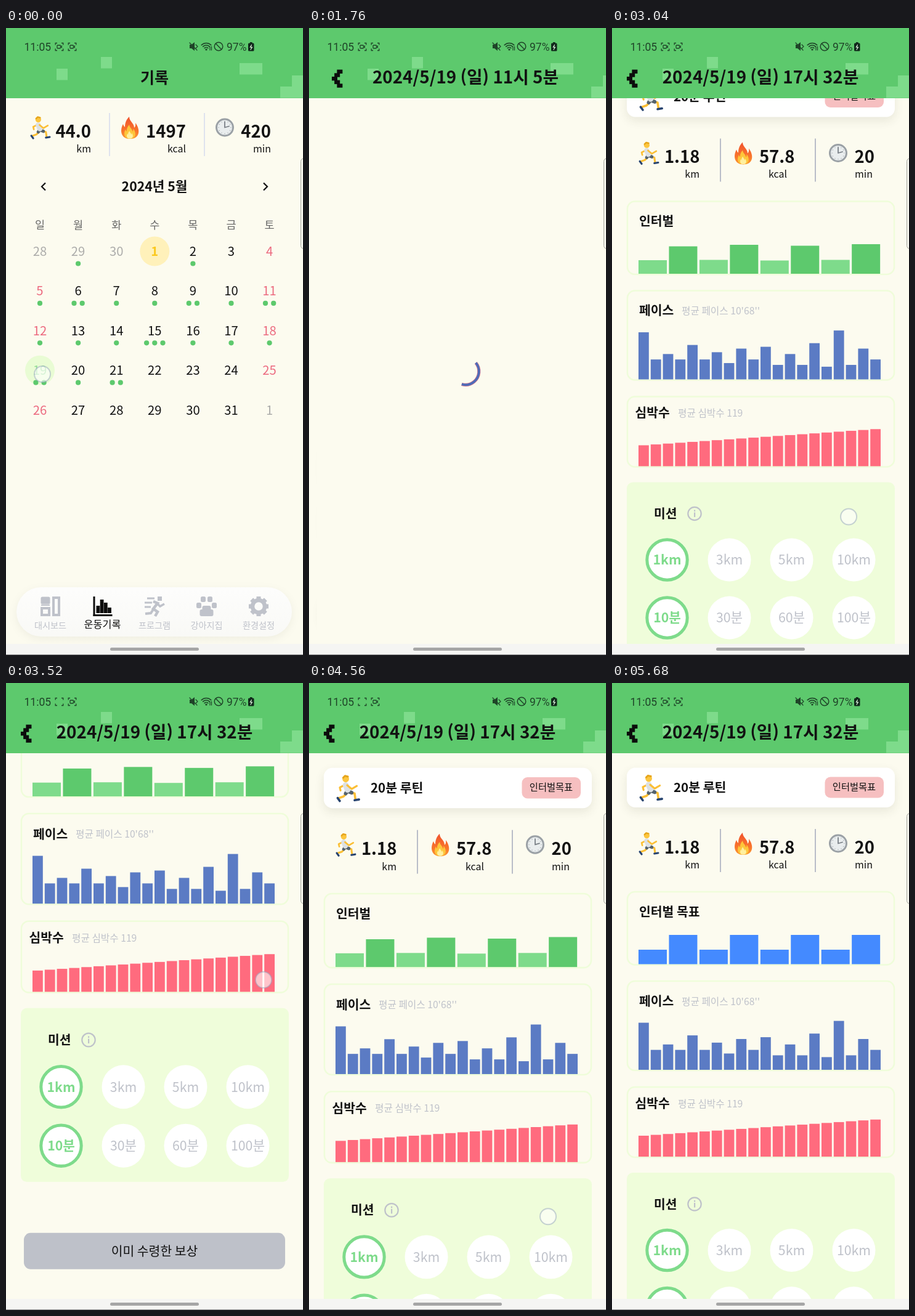
Animation of 482x1018 px, one loop 5.84 s. Source, as an HTML page with a canvas:

```html
<!DOCTYPE html>
<html lang="ko">
<head>
<meta charset="utf-8">
<style>
html, body { margin: 0; width: 100%; height: 100%; overflow: hidden; background: #fcfbef; }
canvas { display: block; width: 482px; height: 1018px; }
</style>
</head>
<body>
<canvas id="stage"></canvas>
<script>
const W = 482, H = 1018, LOOP = 5840, TOP = 114, BOTTOM = 1000;
const FONT = '"Noto Sans CJK KR", "Noto Sans CJK", "Noto Sans", sans-serif';
const C = {
  bg: '#fcfbef', head: '#5dc96d', light: '#7edb8b', ink: '#121212', gray: '#bfc2ca',
  mint: '#effdda', red: '#ec6a7f', blue: '#5b7bc4', pink: '#ff6b7e', status: '#1f4428'
};
const canvas = document.getElementById('stage');
const dpr = window.devicePixelRatio || 1;
canvas.width = W * dpr;
canvas.height = H * dpr;
const g = canvas.getContext('2d');

// ---------- helpers ----------
const clamp = (v, a = 0, b = 1) => Math.min(b, Math.max(a, v));
const ramp = (t, a, b) => clamp((t - a) / (b - a));
const easeOut = p => 1 - (1 - p) ** 3;

// Smooth curve through [time, value] points without overshoot
function curve(t, pts) {
  const n = pts.length - 1;
  if (t <= pts[0][0]) return pts[0][1];
  if (t >= pts[n][0]) return pts[n][1];
  const rate = i => (pts[i + 1][1] - pts[i][1]) / (pts[i + 1][0] - pts[i][0]);
  const slope = i => {
    if (i === 0 || i === n) return 0;
    const a = rate(i - 1), b = rate(i);
    return a * b <= 0 ? 0 : 2 * a * b / (a + b);
  };
  let i = 0;
  while (t > pts[i + 1][0]) i++;
  const d = pts[i + 1][0] - pts[i][0], p = (t - pts[i][0]) / d, q = 1 - p;
  return pts[i][1] * q * q * (1 + 2 * p) + pts[i + 1][1] * p * p * (1 + 2 * q)
    + d * p * q * (slope(i) * q - slope(i + 1) * p);
}
function rect(x, y, w, h, color) {
  g.fillStyle = color;
  g.fillRect(x, y, w, h);
}
function round(x, y, w, h, r, fill, stroke, line = 2) {
  g.beginPath();
  g.roundRect(x, y, w, h, r);
  paint(fill, stroke, line);
}
function circle(x, y, r, fill, stroke, line = 2) {
  g.beginPath();
  g.arc(x, y, r, 0, 7);
  paint(fill, stroke, line);
}
function paint(fill, stroke, line) {
  if (fill) { g.fillStyle = fill; g.fill(); }
  if (stroke) { g.strokeStyle = stroke; g.lineWidth = line; g.stroke(); }
}
function path(points, color, width, cap = 'round') {
  g.beginPath();
  for (let i = 0; i < points.length; i += 2) g.lineTo(points[i], points[i + 1]);
  g.lineCap = cap;
  g.lineJoin = cap === 'round' ? 'round' : 'miter';
  paint(null, color, width);
}
function text(s, x, y, size, color = C.ink, weight = 500, align = 'left', font = FONT) {
  g.font = `${weight} ${size}px ${font}`;
  g.textAlign = align;
  g.fillStyle = color;
  g.fillText(s, x, y);
}
function at(x, y, scale, draw) {
  g.save();
  g.translate(x, y);
  g.scale(scale, scale);
  draw();
  g.restore();
}
function shadow(draw, alpha = 0.1, blur = 16, dy = 6) {
  g.save();
  g.shadowColor = `rgba(60,60,40,${alpha})`;
  g.shadowBlur = blur * dpr;
  g.shadowOffsetY = dy * dpr;
  draw();
  g.restore();
}

// ---------- small pictures ----------
function runner() {
  const skin = '#fbbf35', navy = '#27436f';
  path([11, 14, 5, 17, 6, 21], skin, 2.6);
  path([15, 24, 10, 29, 4, 31], skin, 3);
  path([19, 24, 25, 25, 26, 32], skin, 3);
  path([2, 31, 5, 35], navy, 3);
  path([25, 34, 31, 33], navy, 3);
  path([15, 22, 13, 25], '#56636d', 5);
  path([16, 22, 21, 24], '#56636d', 5);
  path([13, 14, 15.5, 20], '#dde1e4', 8);
  path([15, 14, 21, 19, 28, 15], skin, 2.6);
  circle(13, 5.5, 4.5, '#fcc63f');
  path([9.5, 4, 12, 1.5, 16, 2.5], '#e6a51b', 2.4);
}
function fire() {
  const flame = (color) => {
    g.beginPath();
    g.moveTo(14, 36);
    g.bezierCurveTo(0, 36, -3, 23, 3, 12);
    g.quadraticCurveTo(4, 16, 6, 17);
    g.bezierCurveTo(6, 9, 9, 4, 13, 0);
    g.bezierCurveTo(13, 8, 21, 10, 21, 18);
    g.quadraticCurveTo(24, 15, 23, 10);
    g.bezierCurveTo(32, 22, 30, 36, 14, 36);
    g.fillStyle = color;
    g.fill();
  };
  const tone = g.createLinearGradient(0, 0, 0, 36);
  tone.addColorStop(0, '#f0522d');
  tone.addColorStop(0.65, '#f9762c');
  tone.addColorStop(1, '#fb9a30');
  flame(tone);
  at(5, 13, 0.63, () => flame('#fdc63b'));
  at(9, 23, 0.35, () => flame('#fff0a0'));
}
function clock() {
  circle(0, 0, 13.5, '#e9edee', '#9ba1a6', 3);
  for (let i = 0; i < 12; i++) {
    const a = i * Math.PI / 6;
    circle(10 * Math.cos(a), 10 * Math.sin(a), 0.7, '#a5aaae');
  }
  path([0, -9, 0, 0, 7, -2], '#7a8087', 1.8);
}
function recorder(x, showCam) {
  for (const [sx, sy] of [[-1, -1], [1, -1], [1, 1], [-1, 1]])
    path([x + sx * 3.5, 30.5 + sy * 6, x + sx * 6.3, 30.5 + sy * 6, x + sx * 6.3, 30.5 + sy * 3], C.status, 1.3, 'butt');
  if (!showCam) return;
  round(x - 3.5, 28, 5.5, 5, 1, null, C.status, 1.3);
  path([x + 2, 30.5, x + 4, 28.7, x + 4, 32.3, x + 2, 30.5], C.status, 1);
}

// ---------- system overlays ----------
function statusBar(t) {
  const phase = t % 1040;
  text('11:05', 29.5, 36.5, 17.5, C.status, 400, 'left', 'Roboto, sans-serif');
  recorder(86.5, phase < 240 || phase >= 480);
  recorder(107.5, true);
  g.fillStyle = C.status;
  g.beginPath();
  for (const [x, y] of [[298, 27], [301, 27], [306, 23], [306, 37], [301, 33], [298, 33]]) g.lineTo(x, y);
  g.fill();
  path([298, 24, 310, 36], C.status, 1.3);
  path([308, 27, 311, 30, 308, 33], C.status, 1.3);
  for (const r of [4, 7.5, 11]) {
    g.beginPath();
    g.arc(325, 35.5, r, -2.35, -0.79);
    paint(null, C.status, 1.6);
  }
  circle(325, 35, 1.6, C.status);
  path([331, 30, 331, 36], C.status, 1.2);
  path([333.5, 30, 333.5, 36], C.status, 1.2);
  circle(345, 30, 6.8, null, C.status, 1.5);
  path([340.3, 25.3, 349.7, 34.7], C.status, 1.5);
  text('97%', 358, 36.5, 17.5, C.status, 400, 'left', 'Roboto, sans-serif');
  round(393, 24.5, 9.5, 13, 1.5, '#10281a');
  rect(396, 23, 3.5, 2, '#10281a');
  path([398.5, 27.5, 396.2, 31.2, 399.5, 31.2, 397, 35], '#dff5e0', 1.2);
}
function systemEdges() {
  rect(0, BOTTOM, W, 18, '#f5f5f3');
  rect(0, 1017, W, 1, '#8f8f8f');
  round(169, 1006, 144, 5, 2.5, '#a6a6a6');
  round(478.5, 211.5, 14, 147, 5, '#f6f6ee', '#a3a39c', 1);
}
function touch(x, y, alpha) {
  if (alpha <= 0) return;
  g.save();
  g.globalAlpha = alpha;
  circle(x, y, 13, 'rgba(255,255,255,.6)', 'rgba(150,165,190,.5)', 2);
  g.restore();
}
function header(title, size, back) {
  rect(0, 0, W, TOP, C.head);
  for (const [x, y, w] of [[82, 66, 18], [154, 47, 18], [379, 57, 37], [464, 77, 18], [445, 95, 37]])
    rect(x, y, w, 18.5, C.light);
  text(title, 241, 90, size, C.ink, 700, 'center');
  if (back) for (let i = -2; i <= 2; i++)
    rect(24 + Math.abs(i) * 4.2, 79 + i * 5.7, 9, 6.4, '#0c0c0c');
}

// ---------- shared pieces ----------
function stats(y, x, values, unitX, line) {
  at(x[0], y + 5, 1.03, runner);
  at(x[1], y + 6, 1, fire);
  at(x[2], y + 23.5, 1, clock);
  values.forEach(([value, unit, right], i) => {
    text(value, right, y + 40, 27.5, C.ink, 700, 'right');
    text(unit, unitX[i], y + 64, 16, C.ink, 500, 'right');
  });
  rect(x[3], y, 2, 70, line);
  rect(x[3] + 154, y, 2, 70, line);
}
function recordCard(y) {
  shadow(() => round(24, y, 435, 64.5, 14, '#fff'));
  at(44, y + 11, 1.2, runner);
  text('20분 루틴', 100, y + 39.5, 20.5, C.ink, 700);
  round(345.5, y + 15, 95.5, 34, 9, '#f6bfc0');
  text('인터벌목표', 393, y + 36.5, 15.3, C.ink, 500, 'center');
}

// ---------- calendar page ----------
const dotCount = '01001001211212111311121200000000000';
const tabs = ['대시보드', '운동기록', '프로그램', '강아지집', '환경설정'];

function tabIcon(i, x, y, c) {
  if (i === 0) {
    round(x - 14, y - 14, 12, 9, 1, c, c, 3);
    round(x - 14, y + 3, 12, 11, 0, null, c, 4);
    rect(x - 15, y - 3, 14, 2, c);
    round(x + 5, y - 14, 9, 28, 0, null, c, 4);
  } else if (i === 1) {
    rect(x - 15, y - 16, 3, 32, c);
    rect(x - 15, y + 13, 31, 3, c);
    [12, 22, 17, 9].forEach((h, k) => rect(x - 10 + k * 6.2, y + 11 - h, 5.8, h, c));
  } else if (i === 2) {
    rect(x + 5, y - 16, 7, 7, c);
    path([x - 12, y - 13, x, y - 13], c, 3, 'butt');
    path([x - 16, y - 6, x - 4, y - 6], c, 3, 'butt');
    path([x - 16, y + 1, x - 6, y + 1], c, 3, 'butt');
    path([x - 2, y - 8, x + 5, y - 5, x - 2, y + 4, x + 5, y + 9, x + 1, y + 16], c, 4.5, 'butt');
    path([x - 2, y + 5, x - 6, y + 11, x - 15, y + 12], c, 4, 'butt');
    path([x + 5, y - 4, x + 9, y, x + 16, y - 4], c, 3.5, 'butt');
  } else if (i === 3) {
    for (const [dx, dy] of [[-5.5, -11], [5.5, -11], [-12.5, -1], [12.5, -1]])
      round(x + dx - 4, y + dy - 5, 8, 9, 2.5, c);
    round(x - 7, y - 1, 14, 9, 3, c);
    round(x - 11, y + 5, 22, 11, 3, c);
  } else {
    circle(x, y, 10, null, c, 6.5);
    for (let k = 0; k < 8; k++) {
      g.save();
      g.translate(x, y);
      g.rotate(k * Math.PI / 4);
      rect(-3.5, -16, 7, 6, c);
      g.restore();
    }
  }
}
function tabBar() {
  const tone = g.createLinearGradient(0, 908, 0, 988);
  tone.addColorStop(0, '#fdfdfc');
  tone.addColorStop(1, '#f9f9f6');
  shadow(() => round(17, 908, 447, 80, 40, tone), 0.07, 14, 4);
  tabs.forEach((name, i) => {
    const x = 72 + i * 84.5, on = i === 1;
    tabIcon(i, x, 939, on ? '#0c0c0c' : C.gray);
    text(name, x, on ? 974 : 974.5, on ? 16.3 : 14.2, on ? C.ink : C.gray, 500, 'center');
  });
}
function calendarPage(t) {
  rect(0, 0, W, H, C.bg);
  stats(138, [39, 187, 355, 167],
    [['44.0', 'km', 138], ['1497', 'kcal', 292], ['420', 'min', 430]], [138, 292, 430], '#dfe3ee');
  path([64, 251.5, 58, 257.5, 64, 263.5], C.ink, 2.2, 'butt');
  path([418, 251.5, 424, 257.5, 418, 263.5], C.ink, 2.2, 'butt');
  text('2024년 5월', 241, 265, 21.3, C.ink, 700, 'center');

  const picked = 0.6 + 0.4 * ramp(t, 60, 260);
  [...'일월화수목금토'].forEach((d, i) => text(d, 55 + i * 62.1, 326, 17.5, '#686868', 500, 'center'));
  for (let i = 0; i < 35; i++) {
    const col = i % 7, row = Math.floor(i / 7), x = 55 + col * 62.1, y = 362.5 + row * 64.4;
    const day = i < 3 ? 28 + i : (i - 3) % 31 + 1;
    let color = col % 6 ? C.ink : C.red;
    if (i < 3 || i === 34) color = '#acacaa';
    if (i === 3) { circle(x, y, 24, '#fff1ba'); color = '#fbc91f'; }
    if (i === 21) { circle(x, y, 24, '#e9fcd4'); color = C.head; }
    g.globalAlpha = i === 21 ? picked : 1;
    text(day, x, y + 7.5, 20.3, color, i === 3 ? 700 : 500, 'center');
    g.globalAlpha = 1;
    const n = +dotCount[i];
    for (let k = 0; k < n; k++) circle(x + (k - (n - 1) / 2) * 13.2, y + 20, 4.1, C.head);
  }
  const show = ramp(t, 120, 400);
  if (show > 0) {
    g.save();
    g.globalAlpha = show;
    recordCard(676);
    recordCard(764);
    g.restore();
  }
  tabBar();
  header('기록', 25, false);
}

// ---------- detail page ----------
const paceUnits = [26, 11, 14, 11, 19, 11, 15, 9, 17, 11, 18, 8, 14, 8, 20, 7, 27, 8, 17, 11];
const runHeights = [22, 44.5, 22.5, 47, 21.5, 45.5, 22.5, 48];

function chart(y, h, title, x, titleY, note, noteX) {
  round(25, y + 1, 433, h - 2, 12, null, C.mint, 2.5);
  text(title, x, titleY, 20.4, C.ink, 700);
  if (note) text(note, noteX, titleY - 1.5, 15.7, C.gray, 400);
}
function bars(n, step, w, bottom, height, color) {
  for (let i = 0; i < n; i++) rect(43 + i * step, bottom - height(i), w, height(i), color(i));
}
function detailBody(goal) {
  recordCard(137.5);
  stats(237, [43, 199, 367, 175],
    [['1.18', 'km', 142.5], ['57.8', 'kcal', 296.5], ['20', 'min', 426]], [142, 284, 423], '#b9bdc8');

  chart(338, 120.5, goal ? '인터벌 목표' : '인터벌', 44, 378.5);
  bars(8, 49.45, 46, 456.5,
    i => goal ? (i % 2 ? 47.5 : 23.5) : runHeights[i],
    i => goal ? '#448aff' : i % 2 ? C.head : C.light);

  chart(483, 147, '페이스', 44, 524, "평균 페이스 10'68''", 113);
  bars(20, 19.8, 16.8, 628, i => paceUnits[i] * 2.94, () => C.blue);

  chart(655, 116, '심박수', 37.5, 690, '평균 심박수 119', 107);
  bars(20, 19.8, 16.8, 769, i => 34 + i * 1.38, () => C.pink);

  round(24, 795, 435, 278, 10, C.mint);
  text('미션', 68, 853.5, 20.4, C.ink, 700);
  circle(134, 846, 10.7, null, C.gray, 2.2);
  rect(133, 844, 2.2, 7.5, C.gray);
  rect(133, 840, 2.2, 2.4, C.gray);
  [['1km', '3km', '5km', '10km'], ['10분', '30분', '60분', '100분']].forEach((names, row) =>
    names.forEach((name, i) => {
      const x = 89.5 + i * 101, y = 921 + row * 94;
      circle(x, y, i ? 35 : 32.7, '#fff', i ? null : C.light, 5);
      text(name, x, y + 8, 21.3, i ? C.gray : C.light, i ? 500 : 700, 'center');
    }));
  round(29, 1154.5, 424, 58, 11, '#bec1c9');
  text('이미 수령한 보상', 241, 1191, 20.4, C.ink, 500, 'center');
}
function spinner(t) {
  const a = (t - 1760) / 1000 * Math.PI * 2;
  for (const [color, w] of [['#e0788c', 5.2], ['#4f6cb8', 3.8]]) {
    g.beginPath();
    g.arc(241, 557.5, 21.8, a - 0.7, a + 1.85);
    g.lineCap = 'butt';
    paint(null, color, w);
  }
}
const scrollKeys = [[2840, 0], [2960, 24], [3040, 57], [3200, 160], [3360, 260], [3530, 260], [3640, 234], [3920, 130], [4340, 0]];
const bottomPull = [[3340, 0], [3460, 0.016], [3520, 0.0155], [3920, 0.006], [4160, 0]];
const topPull = [[4330, 0], [4560, 0.0135], [4670, 0.014], [4820, 0.005], [5040, 0]];

function detailPage(t) {
  const loaded = t >= 2000;
  rect(0, 0, W, H, C.bg);
  if (loaded) {
    const low = curve(t, bottomPull), high = curve(t, topPull);
    const pin = low > 0 ? BOTTOM : TOP;
    g.save();
    g.beginPath();
    g.rect(0, TOP, W, BOTTOM - TOP);
    g.clip();
    g.translate(0, pin);
    g.scale(1, 1 + low + high);
    g.translate(0, -pin - curve(t, scrollKeys));
    detailBody(t >= 5360);
    g.restore();
  } else spinner(t);
  header(loaded ? '2024/5/19 (일) 17시 32분' : '2024/5/19 (일) 11시 5분', 27.8, true);
}

// ---------- finger ----------
const fingerX = [[2860, 372], [3040, 384], [3520, 418], [3920, 392], [4560, 388]];
const fingerY = [[2840, 852], [2960, 828], [3040, 794], [3200, 690], [3440, 486], [3520, 482], [3640, 512], [3920, 623], [4340, 772], [4560, 866], [4660, 884]];

function touches(t) {
  const hold = (a, b, fade) => Math.min(ramp(t, a - 40, a), 1 - ramp(t, b, b + fade));
  touch(59, 562, 1 - ramp(t, 60, 200));
  touch(300, 708, hold(1520, 1580, 80));
  touch(curve(t, fingerX), curve(t, fingerY), hold(2880, 4640, 100));
  touch(300, 420, hold(5200, 5360, 160));
}

function draw(t) {
  g.setTransform(dpr, 0, 0, dpr, 0, 0);
  const slide = Math.round(W * (1 - easeOut(ramp(t, 1520, 1866))));
  if (slide > 0) calendarPage(t);
  if (t >= 1520) at(slide, 0, 1, () => detailPage(t));
  statusBar(t);
  systemEdges();
  touches(t);
}
const start = performance.now();
function tick() {
  draw((performance.now() - start) % LOOP);
  requestAnimationFrame(tick);
}
tick();
</script>
</body>
</html>
```
